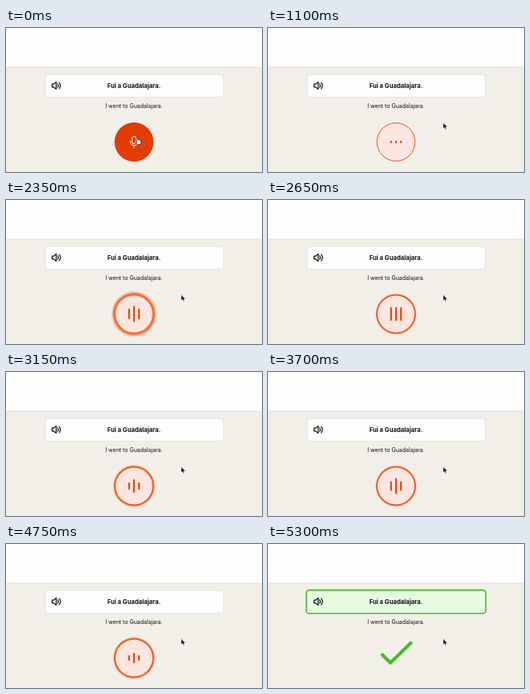
Write an HTML page that moves like this. It is 320 by 180 pixels and loops after 5.45 s.

```html
<!DOCTYPE html>
<html lang="es">
<head>
<meta charset="utf-8">
<style>
  html, body { margin: 0; width: 100%; height: 100%; overflow: hidden; background: #f2efe9; }
  svg { display: block; width: 320px; height: 180px; }
  text { font-family: Inter, Roboto, sans-serif; text-anchor: middle; fill: #111; }
</style>
</head>
<body>
<svg viewBox="0 0 320 180">
  <rect width="320" height="180" fill="#f2efe9"/>
  <rect width="320" height="49" fill="#fefdfe"/>
  <rect y="48.5" width="320" height="1" fill="#e3e1df"/>

  <rect x="49" y="58" width="223" height="28.5" rx="3.5" fill="#fefdfe" stroke="#dedcd8" stroke-width=".8"/>
  <rect id="good" x="47.8" y="57.6" width="224.4" height="29.2" rx="4" fill="#e8fae3" stroke="#43bd2b" stroke-width="1.6"/>
  <g fill="none" stroke="#111" stroke-width="1.2" stroke-linejoin="round" stroke-linecap="round">
    <path d="M57.6 70.2h2l3.2-2.8v9.2l-3.2-2.8h-2z"/>
    <path d="M64.7 70q1.6 2 0 4M66.5 68.2q3.2 3.8 0 7.6"/>
  </g>
  <text x="160" y="74.6" font-size="7.7" font-weight="700">Fui a Guadalajara.</text>
  <text x="160" y="100.4" font-size="7">I went to Guadalajara.</text>

  <g id="button">
    <circle id="outer" cx="160" cy="142.5" fill="#fac3aa"/>
    <circle id="inner" cx="160" cy="142.5" fill="#ff7747"/>
    <circle id="disc" cx="160" cy="142.5" r="23.8" fill="#fde6df"/>
    <circle id="ring" cx="160" cy="142.5" r="23.8" fill="none" stroke="#e85523"/>
    <path id="bars" fill="none" stroke="#dc4b12" stroke-width="2.2" stroke-linecap="round"/>
    <g id="mic">
      <circle cx="160" cy="142.5" r="24.3" fill="#e23c05"/>
      <g fill="none" stroke="#fff" stroke-width="1" stroke-linecap="round">
        <rect x="157.6" y="135.5" width="4.8" height="9" rx="2.4"/>
        <path d="M155.4 141.5q0 5.4 4.6 5.4t4.6-5.4M160 147v2.4"/>
      </g>
    </g>
  </g>
  <path id="check" d="M143 138.5L153 148.5L178.5 123.8" fill="none" stroke="#43bd2b" stroke-width="4.2"
    stroke-linecap="round" stroke-linejoin="round" pathLength="1" stroke-dasharray="1 2"/>

  <path id="hand" fill="#fff" stroke="#111" stroke-width=".7" stroke-linejoin="round"
    d="M162.6 138.2q.8-.7 1.5.1l1 1.7 1.3-.3 1.2.4 1 .6.2 2.7-1 2.3h-3.3l-2.3-2.6q-.3-1 .8-.8l.7.3z"/>
  <path id="arrow" fill="#111" stroke="#fff" stroke-width=".5" d="M219 118.6v7.2l1.7-1.5 1.1 2.7 1.3-.6-1.1-2.5h2.3z"/>
</svg>
<script>
const LOOP = 5450, STEP = 50;
const SPEECH = 1870, PULSE = 260, DONE = 5050;
const el = id => document.getElementById(id);
const set = (id, attrs) => { for (const k in attrs) el(id).setAttribute(k, attrs[k]); };
const ease = (t, a, b) => {
  const p = Math.min(1, Math.max(0, (t - a) / (b - a)));
  return p * p * (3 - 2 * p);
};
const mix = (a, b, p) => a + (b - a) * p;
const wave = (t, start, period) => Math.cos(2 * Math.PI * (t - start) / period);

function drawBars(t) {
  const grow = ease(t, 1250, 1900);
  const side = mix(1, 6 - 2.5 * wave(t, 1950, 1400), grow);
  const middle = mix(1, 8.7 - 1.3 * wave(t, 1950, 700) - wave(t, 1950, 1400), grow);
  const bar = (x, half) => `M${x} ${142.5 - half + 1}V${142.5 + half - 1 + .01}`;
  set('bars', {
    d: bar(153.8, Math.max(1.6, side)) + bar(160, Math.max(1.6, middle)) + bar(166.2, Math.max(1.6, side)),
    opacity: ease(t, 100, 400)
  });
}

function draw(t) {
  const talking = t >= SPEECH;
  const volume = talking ? (1 - wave(t, SPEECH, PULSE)) / 2 : 0;
  set('outer', { r: talking ? 25.6 + 12 * volume : 0 });
  set('inner', { r: talking ? 24.8 + 7.4 * volume : 0 });
  set('ring', {
    'stroke-width': mix(1, 1.5, ease(t, 1600, SPEECH)),
    opacity: 1 - .9 * ease(volume, 0, .6)
  });
  set('mic', { opacity: 1 - ease(t, 0, 400) });
  drawBars(t);

  const done = ease(t, DONE, 5300);
  set('good', { opacity: done });
  set('button', { opacity: 1 - ease(t, DONE, 5200) });
  set('check', { 'stroke-dashoffset': 1 - done, opacity: done > 0 ? 1 : 0 });

  const move = ease(t, 550, 800);
  const away = move > .4;
  set('hand', { opacity: away ? 0 : 1, transform: `translate(${56 * move} ${-19 * move})` });
  set('arrow', { opacity: away ? 1 : 0, transform: `translate(${-56 * (1 - move)} ${19 * (1 - move)})` });
}

const origin = performance.now();
function tick() {
  const t = (performance.now() - origin) % LOOP;
  draw(Math.floor(t / STEP) * STEP);
  requestAnimationFrame(tick);
}
tick();
</script>
</body>
</html>
```
